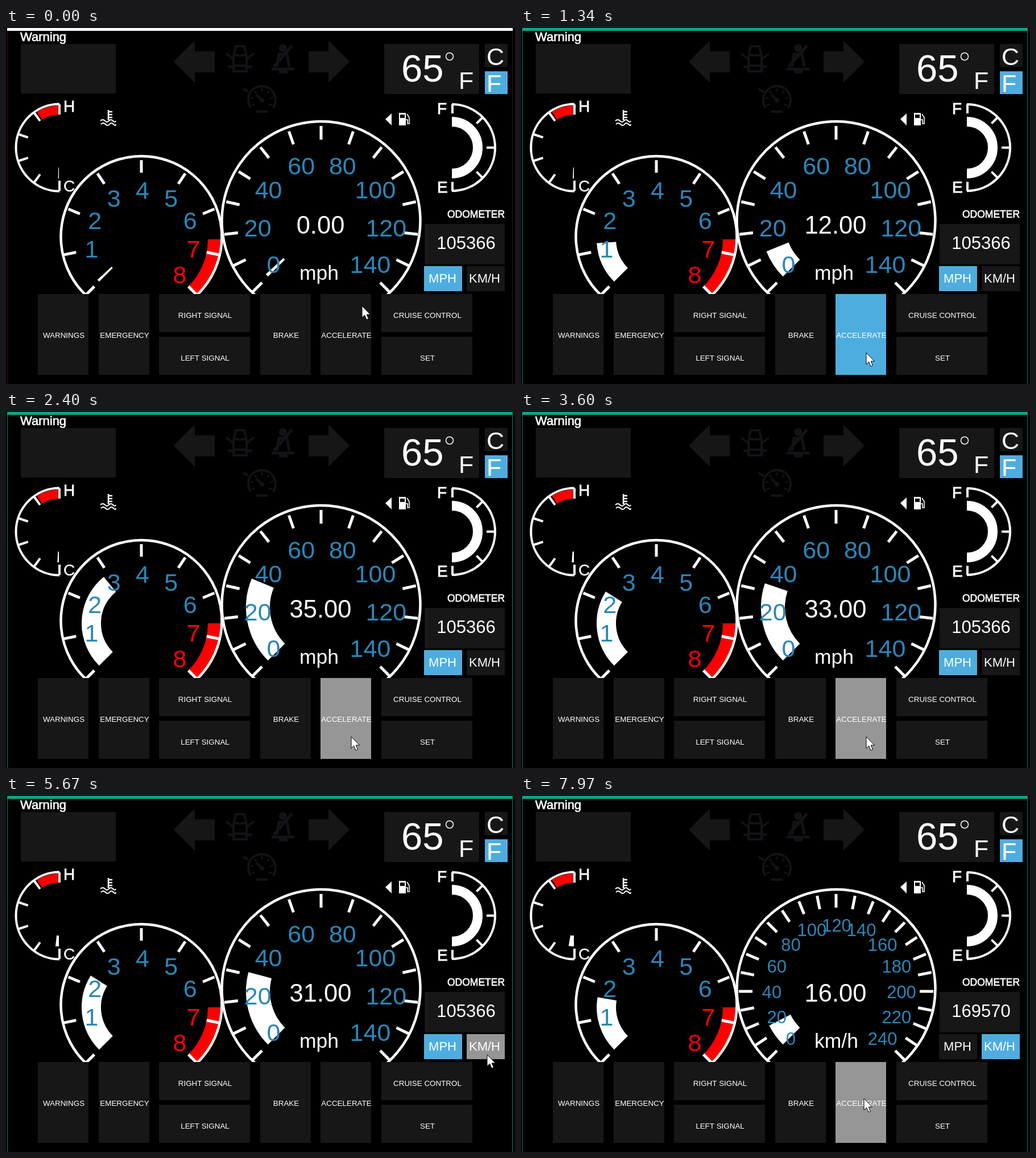
An HTML page with a canvas for the animation above (8 s loop, 895 px wide and 625 px high).

```html
<!DOCTYPE html>
<html lang="en">
<head>
<meta charset="utf-8">
<title>Dashboard</title>
<style>
html, body { margin: 0; width: 100%; height: 100%; overflow: hidden; background: #000; }
canvas { display: block; }
</style>
</head>
<body>
<canvas id="stage" width="895" height="625"></canvas>
<script>
const ctx = document.getElementById('stage').getContext('2d');
const LOOP = 8000, RAD = Math.PI / 180;
const PANEL = '#171717', BLUE = '#4eaddf', GREY = '#969696', LABEL = '#2c86b7', DIM = '#131317';
const FOCUS_AT = 1070, KMH_AT = 6050;

// Pointer moves: start, end, target x, target y
const MOVES = [
  [140, 900, 607, 570], [3600, 3770, 523, 546], [4840, 5380, 826, 470],
  [5669, 5670, 846, 454], [6500, 6860, 667, 501], [7200, 7450, 603, 531],
];
// Bottom bar, column by column; two names share a wide column
const COLUMNS = [['WARNINGS'], ['EMERGENCY'], ['RIGHT SIGNAL', 'LEFT SIGNAL'],
  ['BRAKE'], ['ACCELERATE'], ['CRUISE CONTROL', 'SET']];

const ramp = (t, from, to) => Math.min(1, Math.max(0, (t - from) / (to - from)));
const smooth = k => k * k * (3 - 2 * k);
const within = (t, from, to) => t >= from && t < to;

function stateAt(t) {
  const kmh = t >= KMH_AT, restart = ramp(t, 7640, 7960);
  const speed = kmh ? 16 * restart
    : 28 * ramp(t, FOCUS_AT, 1700) + 7 * ramp(t, 2000, 2160) - 2 * ramp(t, 2840, 4100) - 2 * ramp(t, 4840, 5100);
  const revs = kmh ? 54.7 * restart : 96 * ramp(t, FOCUS_AT, 1700) - 19 * ramp(t, 2840, 3200);
  let mx = 626, my = 488;
  for (const [from, to, x, y] of MOVES) {
    const k = smooth(ramp(t, from, to));
    mx += (x - mx) * k;
    my += (y - my) * k;
  }
  return {
    t, kmh, revs, mx, my,
    speed: Math.floor(speed + 1e-6),
    heat: 1.5 + 8.5 * (t / LOOP) ** 1.6,
    pressed: {
      ACCELERATE: within(t, FOCUS_AT, 2160) || within(t, 7640, 7945),
      BRAKE: within(t, 4300, 4830),
    },
  };
}

function rect(x, y, w, h, color) {
  ctx.fillStyle = color;
  ctx.fillRect(x, y, w, h);
}
function text(s, x, y, size, align = 'left', color = '#fff', weight = 0) {
  ctx.font = `${size}px "Liberation Sans", Arial, sans-serif`;
  ctx.textAlign = align;
  ctx.fillStyle = ctx.strokeStyle = color;
  ctx.fillText(s, x, y);
  if (weight) { ctx.lineWidth = weight; ctx.strokeText(s, x, y); }
}
const fill = (d, color) => { ctx.fillStyle = color; ctx.fill(new Path2D(d)); };
function line(d, color, width) {
  ctx.strokeStyle = color;
  ctx.lineWidth = width;
  ctx.stroke(new Path2D(d));
}
function arc(x, y, r, from, to, width, color = '#fff') {
  ctx.beginPath();
  ctx.arc(x, y, r, from * RAD, to * RAD);
  ctx.strokeStyle = color;
  ctx.lineWidth = width;
  ctx.stroke();
}
const band = (x, y, r1, r2, from, to, color) => arc(x, y, (r1 + r2) / 2, from, to, r2 - r1, color);
function ticks(x, y, r1, r2, from, sweep, count, width, color = '#fff') {
  for (let i = 0; i <= count; i++) {
    const a = (from + sweep * i / count) * RAD, c = Math.cos(a), s = Math.sin(a);
    line(`M${x + c * r1} ${y + s * r1}L${x + c * r2} ${y + s * r2}`, color, width);
  }
}
// Numbers first..last around an ellipse, symmetric about the top
function labels(x, y, rx, ry, step, first, last, middle, unit, size, redFrom = Infinity) {
  for (let i = first; i <= last; i++) {
    const a = (i - middle) * step * RAD;
    text(i * unit, x + rx * Math.sin(a), y - ry * Math.cos(a) + size * .34, size, 'center', i < redFrom ? LABEL : '#f00');
  }
}

function drawFrame(focused) {
  const side = focused ? '#0b7f64' : '#3c120c';
  rect(2, 5, 1, 620, side);
  rect(890, 5, 1, 620, side);
  rect(2, 0, 889, 5, focused ? '#06a985' : '#fff');
}

function drawIndicators() {
  const arrow = 'M0 59L37 22V41H72V78H37V96Z';
  for (const [x, dir] of [[295, 1], [604, -1]]) {
    ctx.save();
    ctx.translate(x, 0);
    ctx.scale(dir, 1);
    fill(arrow, '#161616');
    ctx.restore();
  }
  // car with open doors
  line('M400 76V50L404 32H419L423 50V76ZM400 48H423M400 66H423M399 54L387 45M424 54L436 45M399 68H391M424 68H432', DIM, 4);
  // seat belt
  arc(487, 35, 3.5, 0, 360, 7, DIM);
  line('M476 68L480 46H494L498 68M467 72H507M503 31L471 68M480 77H495', DIM, 5);
  // cruise dial
  arc(450, 126, 24, 145, 395, 4, DIM);
  ticks(450, 126, 15, 20, 150, 240, 6, 3, DIM);
  arc(450, 127, 2, 0, 360, 4, DIM);
  line('M450 127L440 117M417 107L427 112M440 147H460', DIM, 4);
}

function drawTopPanels() {
  text('Warning', 25, 22.5, 22, 'left', '#fff', .7);
  rect(26, 28, 167, 87, PANEL);
  rect(665, 28, 167, 88, PANEL);
  text('65', 695, 94, 67);
  arc(780, 50, 6.5, 0, 360, 1.5);
  text('F', 796, 107, 43);
  rect(842, 28, 40, 40, PANEL);
  text('C', 845, 65, 43);
  rect(842, 76, 40, 40, BLUE);
  text('F', 845, 112, 43);
}

function drawSideGauges(heat) {
  // coolant
  band(94, 210, 58, 74, 238, 268, '#f00');
  arc(94, 210, 76.5, 90, 270, 4);
  ticks(94, 210, 58, 76, 90, 180, 5, 4);
  band(93, 210, 35, 54, 90, 90 + heat, '#fff');
  text('H', 101, 147, 28, 'left', '#fff', .8);
  text('C', 101, 287, 28, 'left', '#fff', .3);
  line('M180 144V162M181 147H187M181 152H187M181 157H187', '#fff', 2.5);
  line('M166 163q4-4 8 0t7 0t7 0t5 0M167 169q4-4 8 0t7 0t7 0t4 0', '#fff', 2);
  // fuel
  arc(784, 210, 76, -90, 90, 4);
  ticks(785, 210, 60, 76, -90, 180, 4, 4);
  band(784, 210, 37, 54, -90, 90, '#fff');
  text('F', 758, 151, 28, 'left', '#fff', .9);
  text('E', 758, 289, 28, 'left', '#fff', .9);
  fill('M667 160L678 150V171Z', '#fff');
  rect(691, 149, 12, 22, '#fff');
  rect(693, 152, 8, 6, '#000');
  line('M703 161h3v7h3v-11l-4-6', '#fff', 1.6);
}

function drawDials({ speed, revs, kmh }) {
  const max = kmh ? 240 : 140, sweep = 270, zero = 135;
  const value = (x, y, r1, r2, angle) => band(x, y, r1, r2, zero, zero + Math.max(2.4, angle), '#fff');
  ctx.save();
  ctx.beginPath();
  ctx.rect(0, 0, 895, 467);
  ctx.clip();

  band(238, 371, 117, 139, 0, 45, '#f00');
  arc(238, 366.5, 141.5, 130, 410, 4.5);
  ticks(238, 371, 117, 139, zero, sweep, 8, 5);
  value(238, 371, 71, 105, revs);
  labels(240, 372.5, 91, 87.5, 33.5, 1, 8, 4, 1, 43, 7);

  arc(554, 338.5, 174.5, 130, 410, 4.5);
  ticks(554, 343, 147, 171, zero, sweep, max / 10, 5);
  value(554, 343, 90, 132, speed / max * sweep);
  if (kmh) labels(555, 344, 114, 117, 22.5, 0, 12, 6, 20, 31);
  else labels(555.5, 344.5, 113, 108, 37.5, 0, 7, 3.5, 20, 43);
  ctx.restore();

  text(speed.toFixed(2), 553, 361, 43.5, 'center');
  text(kmh ? 'km/h' : 'mph', 516, 441.5, 35.5);
}

function drawControls({ t, kmh, mx, my, pressed }) {
  const hover = (x, y, w, h) => t >= 180 && mx >= x && mx < x + w && my >= y && my < y + h;
  const button = (x, y, w, h, on) => rect(x, y, w, h, on ? BLUE : hover(x, y, w, h) ? GREY : PANEL);

  text('ODOMETER', 776, 333, 17.5, 'left', '#fff', .7);
  rect(736, 344, 141, 71, PANEL);
  text(kmh ? '169570' : '105366', 809, 387.5, 31, 'center');
  button(735, 418, 67, 44, !kmh);
  button(810, 418, 67, 44, kmh);
  text('MPH', 767.5, 446.5, 22, 'center');
  text('KM/H', 841.5, 446.5, 22, 'center');

  let left = 56;
  for (const names of COLUMNS) {
    const stacked = names.length > 1, w = stacked ? 160 : 89, h = stacked ? 67 : 142;
    const x = Math.round(left);
    names.forEach((name, row) => {
      const y = 467 + row * 75;
      button(x, y, w, h, pressed[name]);
      text(name, x + w / 2 + 1, y + h / 2 + (stacked ? 8 : 6), 13.4, 'center');
    });
    left += w + 17.6;
  }
}

function drawPointer({ mx, my }) {
  const shape = 'M0 0V20.5L4.6 16L8 24L11.5 22.5L8.2 15H14.5Z';
  ctx.save();
  ctx.translate(mx, my);
  fill(shape, '#fff');
  line(shape, '#000', 1);
  ctx.restore();
}

function draw(t) {
  const state = stateAt(t);
  rect(0, 0, 895, 625, '#000');
  drawFrame(t >= FOCUS_AT);
  drawIndicators();
  drawTopPanels();
  drawSideGauges(state.heat);
  drawDials(state);
  drawControls(state);
  drawPointer(state);
}

const start = performance.now();
function tick() {
  draw((performance.now() - start) % LOOP);
  requestAnimationFrame(tick);
}
tick();
</script>
</body>
</html>
```
